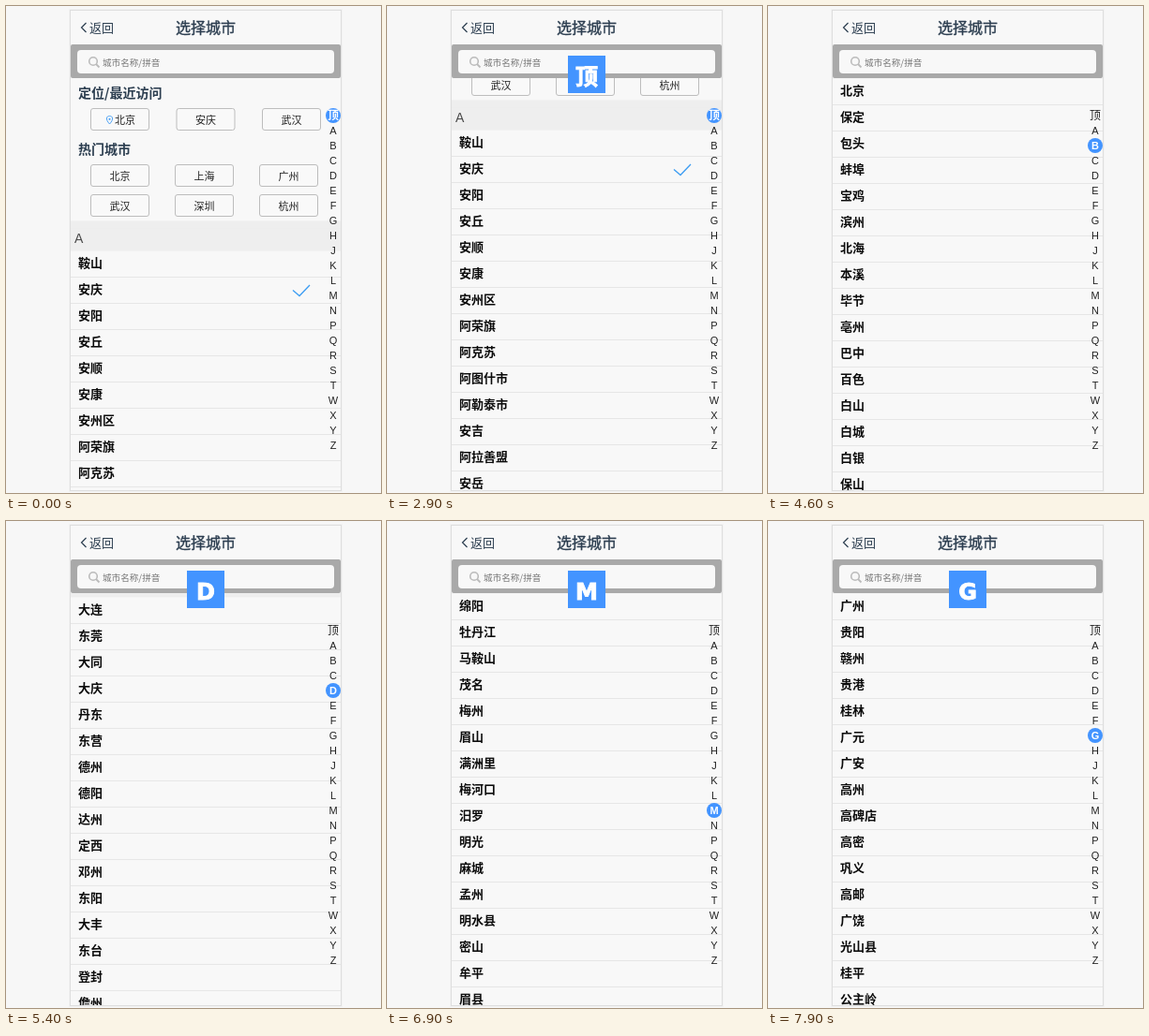
Recreate the animation shown at these times as an HTML page. Size 400 by 520 pixels, loop 8 s.

```html
<!DOCTYPE html>
<html lang="zh">
<head>
<meta charset="utf-8">
<style>
html, body { margin: 0; width: 100%; height: 100%; overflow: hidden; background: #f7f7f7; }
svg { display: block; }
text { font-family: "Noto Sans CJK SC", "Noto Sans CJK", "Noto Sans", sans-serif; white-space: pre; }
.latin { font-family: "Liberation Sans", "Noto Sans CJK SC", sans-serif; }
.wide { font-family: "DejaVu Sans", "Noto Sans CJK SC", sans-serif; }
</style>
</head>
<body>
<svg id="stage" width="400" height="520" viewBox="0 0 400 520">
  <defs>
    <clipPath id="view"><rect x="69" y="77" width="288" height="440"/></clipPath>
  </defs>
</svg>
<script>
const LOOP = 8000, TICK = 100, ROW = 28, HEAD = 24, LIST_TOP = 237.5, VIEW_TOP = 77.5;
const BLUE = '#4394ff', NAVY = '#2c3e50';
const LETTERS = [...'顶ABCDEFGHJKLMNPQRSTWXYZ'];
const CITIES = {
  A: '鞍山 安庆 安阳 安丘 安顺 安康 安州区 阿荣旗 阿克苏 阿图什市 阿勒泰市 安吉 阿拉善盟 安岳 安平 安溪 安达 安宁 安福 安化',
  B: '北京 保定 包头 蚌埠 宝鸡 滨州 北海 本溪 毕节 亳州 巴中 百色 白山 白城 白银 保山 霸州 北流 泊头 博乐 宝应 博兴',
  C: '重庆 成都 长沙 长春 常州 沧州 常德 郴州 承德 赤峰 滁州 长治 潮州 朝阳 池州 崇左 楚雄 常熟 慈溪 长兴 昌吉 从化 赤壁 岑溪',
  D: '大连 东莞 大同 大庆 丹东 东营 德州 德阳 达州 定西 邓州 东阳 大丰 东台 登封 儋州 都匀 敦化 大理 当阳 德兴 灯塔',
  E: '鄂尔多斯 恩施 鄂州 峨眉山 恩平 额敏 二连浩特 峨边 洱源 鄂托克旗 额尔古纳 恩阳',
  F: '福州 佛山 抚顺 阜阳 抚州 防城港 阜新 福清 富阳 丰城 肥城 福安 福鼎 凤城 汾阳 奉化 扶余 富锦 丰镇 阜康',
  G: '广州 贵阳 赣州 贵港 桂林 广元 广安 高州 高碑店 高密 巩义 高邮 广饶 光山县 桂平 公主岭 盖州 古交 固原 广汉 个旧 高安',
  H: '杭州 合肥 哈尔滨 海口 惠州 湖州 邯郸 衡阳 淮安 菏泽 呼和浩特 衡水 怀化 黄石 黄冈 淮南 淮北 河源 鹤壁 汉中 葫芦岛 海宁',
  J: '济南 嘉兴 金华 江门 济宁 吉林 荆州 九江 焦作 锦州 晋中 揭阳 吉安 晋城 荆门 佳木斯 景德镇 酒泉 鸡西 江阴 晋江 句容',
  K: '昆明 昆山 开封 克拉玛依 凯里 开平 开远 库尔勒 开化 开阳 奎屯 开州区 垦利 宽城 库车 康县 喀什地区 克州 垦丁',
  L: '连云港 临沂 洛阳 柳州 廊坊 兰州 聊城 龙岩 泸州 丽水 六安 娄底 乐山 莱芜 拉萨 吕梁 漯河 临汾 辽阳 丽江',
  M: '绵阳 牡丹江 马鞍山 茂名 梅州 眉山 满洲里 梅河口 汨罗 明光 麻城 孟州 明水县 密山 牟平 眉县 蒙自 蒙城 弥勒 米易',
  N: '南京 宁波 南昌 南宁 南通 南阳 南充 宁德 内江 南平 怒江 宁国 南安 南康 宁乡 讷河 南雄 宁海',
  P: '平顶山 莆田 盘锦 攀枝花 萍乡 濮阳 普洱 平凉 平湖 邳州 彭州 普宁 平度 蓬莱 磐石 凭祥 郫县 沛县'
};

const stage = document.getElementById('stage');

function add(parent, tag, attrs) {
  const node = document.createElementNS('http://www.w3.org/2000/svg', tag);
  for (const key in attrs) node.setAttribute(key, attrs[key]);
  return parent.appendChild(node);
}

// y is the vertical middle of the glyphs
function label(parent, str, x, y, size, attrs) {
  const node = add(parent, 'text', { x, y: y + size * 0.37, 'font-size': size, fill: '#333', ...attrs });
  node.textContent = str;
  return node;
}

const rect = (parent, x, y, width, height, attrs) => add(parent, 'rect', { x, y, width, height, ...attrs });
const line = (parent, d, stroke, width) =>
  add(parent, 'path', { d, fill: 'none', stroke, 'stroke-width': width });
const MIDDLE = { 'text-anchor': 'middle' };

// Panel
rect(stage, 67.5, 3.5, 291, 515, { fill: 'none', stroke: '#f2f2f2' });
rect(stage, 68.5, 4.5, 289, 513, { fill: '#f8f8f8', stroke: '#dedede' });

// Scrolling content
const list = add(add(stage, 'g', { 'clip-path': 'url(#view)' }), 'g', {});

function button(x, y, str, pinned) {
  rect(list, x + 0.5, y + 0.5, 62, 23, { rx: 2.5, fill: '#f9f9f9', stroke: '#bdbdbd' });
  label(list, str, x + (pinned ? 37 : 31.5), y + 13, 11, { ...MIDDLE, fill: '#222' });
  if (pinned) {
    line(list, `M${x + 20.5} ${y + 17}c-4.6 -5 -3.6 -8.5 0 -8.5s4.6 3.5 0 8.5z`, '#4aa0f5', 1);
    add(list, 'circle', { cx: x + 20.5, cy: y + 11.8, r: 1.1, fill: '#4aa0f5' });
  }
}

const heading = { 'font-weight': 700, fill: NAVY };
label(list, '定位/最近访问', 77, 93, 14, heading);
['北京', '安庆', '武汉'].forEach((name, i) => button(90 + i * 91.5, 109, name, i === 0));
label(list, '热门城市', 77, 153, 14, heading);
['北京', '上海', '广州', '武汉', '深圳', '杭州'].forEach((name, i) =>
  button(90 + (i % 3) * 90, i < 3 ? 169 : 201, name));
rect(list, 69, 229.5, 288, 9, { fill: '#eee' });

const tops = { 顶: 0 };
let cursor = LIST_TOP;
for (const letter in CITIES) {
  rect(list, 69, cursor, 288, HEAD, { fill: '#eee' });
  label(list, letter, 73, cursor + 10.7, 14, { class: 'latin', fill: '#4a4a4a' });
  cursor += HEAD;
  tops[letter] = cursor - VIEW_TOP;
  for (const city of CITIES[letter].split(' ')) {
    label(list, city, 77, cursor + 12.5, 13, { 'font-weight': 700, fill: '#0c0c0c' });
    line(list, `M69 ${cursor + ROW}h288`, '#e6e6e6', 1);
    cursor += ROW;
  }
}
line(list, 'M306 303.5l7 6l11 -11.5', '#3d9df2', 1.3);

// Title and search bar
line(stage, 'M85.5 18l-5 5l5 5', NAVY, 1.2);
label(stage, '返回', 89, 23, 13, { fill: NAVY });
label(stage, '选择城市', 213, 23, 16, { ...MIDDLE, fill: NAVY, stroke: NAVY, 'stroke-width': 0.35 });
rect(stage, 69, 41, 288, 36, { rx: 2, fill: '#a9a9a9' });
rect(stage, 76, 47, 274, 25, { rx: 4, fill: '#f8f8f8' });
add(stage, 'circle', { cx: 93, cy: 59, r: 4.3, fill: 'none', stroke: '#bbb', 'stroke-width': 1.6 });
line(stage, 'M96 62l3.5 3.5', '#bbb', 1.8);
label(stage, '城市名称/拼音', 103, 60, 9.6, { fill: '#757575' });
const caret = rect(stage, 103.5, 53, 1, 12, { fill: '#222' });

// Letter index
const dot = add(stage, 'circle', { cx: 349, r: 8, fill: BLUE });
const marks = LETTERS.map((letter, i) =>
  label(stage, letter, 349, 117 + 16 * i, i ? 11 : 12, { ...MIDDLE, class: 'latin' }));

// Letter toast
const toast = add(stage, 'g', {});
rect(toast, 193, 53, 40, 40, { fill: BLUE });
const toastText = label(toast, '', 213, 75, 24,
  { ...MIDDLE, class: 'wide', 'font-weight': 700, fill: '#fff', stroke: '#fff', 'stroke-width': 0.9 });

// Scroll moves: start, end, letter
const sweep = (from, to, letters) => [...letters].map((letter, i) => {
  const step = (to - from) / letters.length;
  return [from + i * step, from + (i + 1) * step, letter];
});
const moves = [
  ...sweep(4000, 4300, 'B'), ...sweep(5000, 5215, 'C'), ...sweep(5215, 5415, 'D'),
  ...sweep(5415, 6256.7, 'EFGHJK'), ...sweep(6256.7, 6456.7, 'L'),
  ...sweep(6456.7, 6690, 'MN'), ...sweep(6690, 6900, 'M'), ...sweep(6900, 7900, 'LKJHG')
];
const fades = [[0, 0], [2899, 0], [2900, 1], [3300, 1], [3600, 0], [3790, 0], [4050, 1],
  [4300, 1], [4600, 0], [4890, 0], [5150, 1], [LOOP, 1]];

const easeOut = p => 1 - (1 - p) ** 2;
const clamp = p => Math.min(1, Math.max(0, p));

function scrollAt(t) {
  if (t < 2900) return 0;
  let y = 129 + (tops.A - 129) * easeOut(clamp((t - 2900) / 200));
  for (const [start, end, letter] of moves) {
    if (t < start) break;
    y += (tops[letter] - y) * easeOut(clamp((t - start) / (end - start)));
  }
  return y;
}

function fadeAt(t) {
  const i = fades.findIndex(([time]) => time > t);
  const [t0, a] = fades[i - 1], [t1, b] = fades[i];
  return a + (b - a) * (t - t0) / (t1 - t0);
}

function render(t) {
  const y = scrollAt(t);
  // a section is active once its header slides under the search bar
  let active = 0;
  LETTERS.forEach((letter, i) => { if (tops[letter] - HEAD <= y) active = i; });

  list.setAttribute('transform', `translate(0 ${-y})`);
  caret.setAttribute('opacity', t < 2700 && t % 900 >= 500 ? 1 : 0);
  dot.setAttribute('cy', 117 + 16 * active);
  marks.forEach((mark, i) => {
    mark.setAttribute('fill', i === active ? '#fff' : '#222');
    mark.setAttribute('font-weight', i === active ? 700 : 400);
  });
  toastText.textContent = LETTERS[active];
  toast.setAttribute('opacity', fadeAt(t));
}

// The picture advances in steps of one tick
const begin = performance.now();
function tick() {
  const t = (performance.now() - begin) % LOOP;
  render(Math.floor(t / TICK) * TICK);
  requestAnimationFrame(tick);
}
tick();
</script>
</body>
</html>
```
